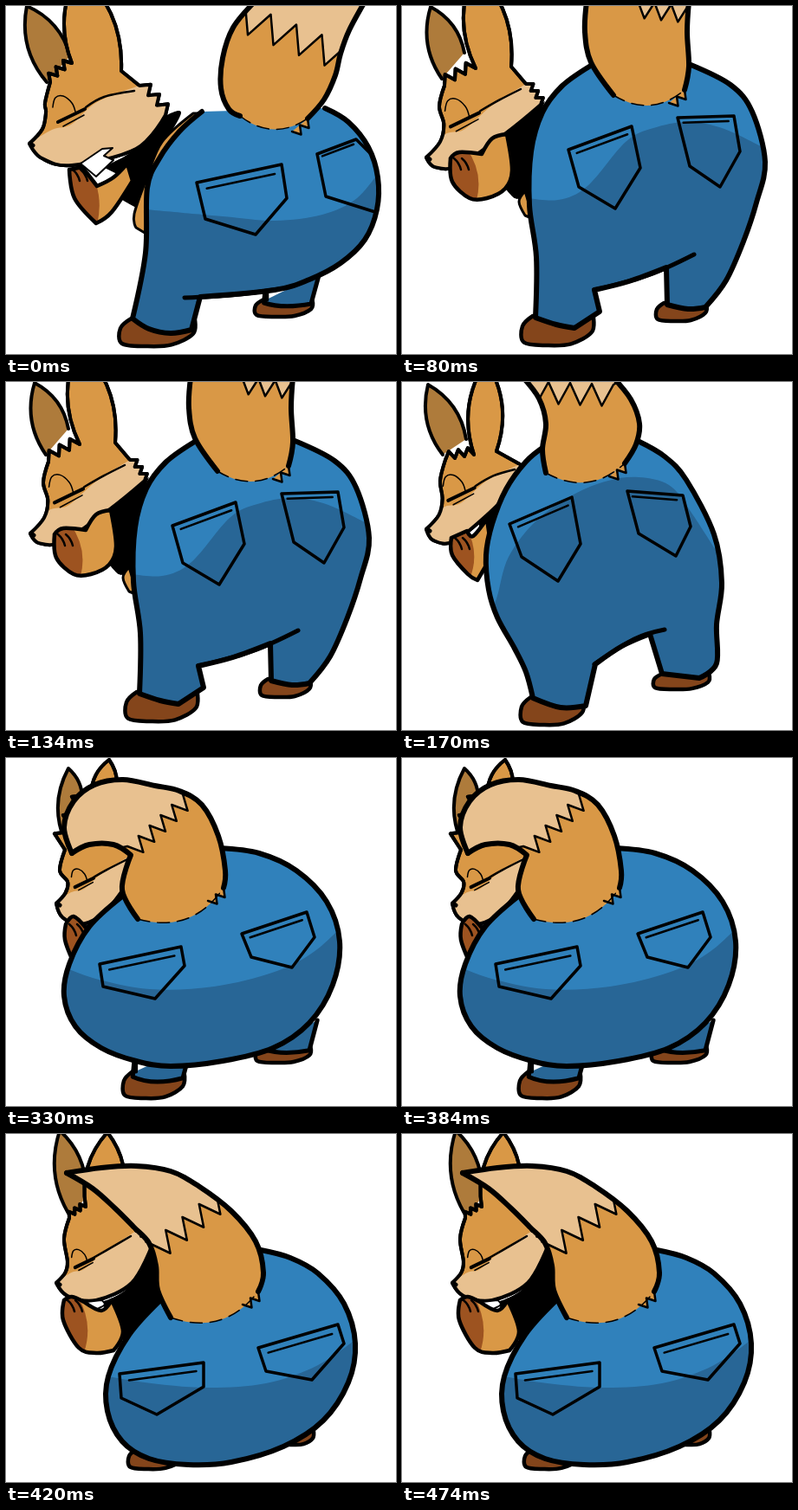
Write an HTML page that moves like this. It is 450 px wide and 402 px high and loops after 0.51 s.

```html
<!DOCTYPE html>
<html lang="en">
<head>
<meta charset="utf-8">
<title>Fox tail wag</title>
<style>
html, body { margin: 0; width: 100%; height: 100%; overflow: hidden; background: #fff; }
svg { display: block; width: 450px; height: 402px; overflow: hidden; }
path { stroke: #000; stroke-linecap: round; stroke-linejoin: round; }
#strip { animation: flip 510ms step-end infinite; }
@keyframes flip {
  0% { transform: translateX(0); }
  15.686% { transform: translateX(-450px); }
  33.333% { transform: translateX(-900px); }
  49.019% { transform: translateX(-1350px); }
  64.705% { transform: translateX(-1800px); }
  82.352% { transform: translateX(-2250px); }
}
</style>
</head>
<body>
<svg viewBox="0 0 450 402"><g id="strip"></g></svg>
<script>
const ORANGE = '#d99846', TAN = '#e8c190', EAR = '#ae7b3b', HAND = '#9d5320',
  JEANS = '#3081bb', SHADE = '#286696', SHOE = '#84451b';

// Points: "x,y" pairs, "!" marks a corner.
const pts = text => text.split(' ').map(s => {
  const p = s.split(',').map(parseFloat);
  p.hard = s.endsWith('!');
  return p.hard ? Object.assign([p[0], p[1]], { hard: true }) : p;
});
const add = (p, x, y, s = 1) => [p[0] + x * s, p[1] + y * s];

// Point at share t of a-b, pushed sideways by k times the length of a-b.
const side = (a, b, t, k) => {
  const dx = b[0] - a[0], dy = b[1] - a[1];
  return [a[0] + dx * t - dy * k, a[1] + dy * t + dx * k];
};

function spline(p, start = 'M') {
  const handle = (i, sign) => {
    const a = p[i - 1], b = p[i + 1];
    return p[i].hard || !a || !b ? p[i]
      : add(p[i], b[0] - a[0], b[1] - a[1], sign / 6);
  };
  let d = `${start}${p[0]}`;
  for (let i = 1; i < p.length; i++) d += `C${handle(i - 1, 1)} ${handle(i, -1)} ${p[i]}`;
  return d;
}

function zigzag(a, b, n, k) {
  let d = '';
  for (let i = 0; i < n; i++) d += `L${side(a, b, (i + 0.5) / n, k / n)}L${side(a, b, (i + 1) / n, 0)}`;
  return d;
}

const earSides = ([a, tip, b]) =>
  `L${a}Q${side(a, tip, 0.5, -0.24)} ${tip}Q${side(tip, b, 0.5, -0.24)} ${b}`;

const draw = (d, fill, width = 0) =>
  `<path d="${d}" fill="${fill}" stroke-width="${width}"${width ? '' : ' style="stroke:none"'}/>`;
const line = (d, width) => draw(d, 'none', width);

let clips = 0;
const clipped = (d, inside) => {
  const id = 'clip' + clips++;
  return `<clipPath id="${id}"><path d="${d}"/></clipPath><g clip-path="url(#${id})">${inside}</g>`;
};

function head({ far, near, face }) {
  const [nose, eye, crown, back, jaw, cheek, chin] = pts(face);
  const s = Math.hypot(eye[0] - nose[0], eye[1] - nose[1]) / 57;
  const farEar = pts(far), nearEar = pts(near);
  const at = (x, y) => add(eye, x, y, s);
  const lip = add(side(nose, chin, 0.35, 0), -3, 8);
  const skull = spline([nose, add(nose, 15, -17, s), add(nose, 19, -36, s), add(crown, -6, 24), crown]) +
    zigzag(crown, nearEar[0], 3, -0.8) + earSides(nearEar) + `L${back}` +
    zigzag(back, jaw, 3, -0.7) + spline([jaw, cheek, chin, lip, nose], 'L') + 'Z';
  const mask = spline([add(nose, -8, 4), at(-22, 15), at(0, 9), at(30, -17), back]) + 'L220,90V220H0Z';
  const lid = spline([at(-21, -11), at(-18, -22), at(-9, -24), at(1, -16), at(5, -6)]);
  return draw('M' + farEar[0] + earSides(farEar), EAR, 4) +
    draw(skull, ORANGE, 4) + clipped(skull, draw(mask, TAN)) + line(skull, 4) +
    line(lid, 1.5) + line(`M${at(-15, 6)}L${at(16, -9)}`, 4) + line(`M${at(-9, 11)}L${at(15, -2)}`, 1.5) +
    line(spline([at(17, -11), at(38, -23), add(back, -6, 6)]), 2.5) +
    line(`M${add(nose, 1, 0)}l3,2`, 5);
}

function arm(text, cuff) {
  const p = pts(text), [a, b] = pts(cuff);
  const d = spline([...p, p[0]]);
  const paw = `M${a}Q${side(a, b, 0.5, -0.25)} ${b}H0V${a[1]}Z`;
  return draw(d, ORANGE) + clipped(d, draw(paw, HAND)) + line(d, 4.5) +
    [4, 13].map(x => line(`M${add(p[0], x, 0)}q6,5 8,13`, 2.5)).join('');
}

function foot([x, y, w, h, leg]) {
  const at = (u, v) => [x + u * w, y + v * h];
  const shoe = spline([at(0.15, 0), at(0, 0.35), at(0.02, 0.9), at(0.35, 1), at(0.7, 0.95), at(1, 0.55), at(1.02, 0)]);
  const shin = `M${at(0.2, 0)}v-30L${at(0.15, 0.2)}Q${at(0.5, 0.55)} ${at(1, 0.25)}L${add(at(1.15, 0), 0, -30)}`;
  return draw(shoe, SHOE, 4.5) + (leg ? draw(shin, SHADE, 5) : '');
}

function pocket(text) {
  const p = pts(text), [a, b] = p;
  return line(`M${p.join('L')}Z`, 3.5) +
    line(`M${side(a, b, 0.1, 0.09)}L${side(a, b, 0.9, 0.09)}`, 2.5);
}

function jeans({ body, shade, seam, pockets }) {
  const d = spline(pts(body));
  return draw(d, JEANS) +
    clipped(d, draw(spline(pts(shade)) + 'L470,402H0Z', SHADE) + pockets.map(pocket).join('')) +
    line(d, 6) + (seam ? line(spline(pts(seam)), 5) : '');
}

function tail({ left, right, tip, curl }) {
  const l = pts(left), r = pts(right), a = l[l.length - 1], b = r[r.length - 1];
  const rump = `Q${side(a, b, 0.5, 0.36)} ${b}`;
  const d = spline(l) + rump + spline(r.reverse(), 'L') + 'Z';
  let end = '';
  if (tip) {
    const [p, q, n] = pts(tip);
    end = clipped(d, draw(`M${p}${zigzag(p, q, n[0], 1)}L${side(p, q, 6, -3)}L${side(p, q, -5, -3)}Z`, TAN, 2.5));
  }
  const root = add(b, -18, 15);
  const tuft = draw(`M${b}${zigzag(b, root, 2, -0.8)}`, ORANGE);
  const tuftLine = line(`M${b}${zigzag(b, root, 2, -0.8)}`, 2.5);
  return draw(d, ORANGE) + tuft + end + tuftLine +
    `<g stroke-dasharray="14 9">${line(`M${a}${rump}`, 1.5)}</g>` +
    line(spline(l), 6) + line(spline(r), 6) + (curl ? draw(spline(pts(curl)) + 'Z', TAN, 3) : '');
}

// face: nose, eye, crown, back of head, jaw, cheek, chin. feet: x, y, width, height, shin.
const poses = [
  {
    far: '47,88 24,0 74,58', near: '76,66 84,-40 133,75',
    face: '27,159 75,128 51,88 154,92 184,126 150,165 76,184',
    jacket: '112,186! 150,165 182,128! 202,124 172,180 159,238! 134,224! 140,200!',
    mouth: '86,182! 111,165! 123,164! 113,173! 124,178! 104,197!',
    arm: '73,189! 88,186! 105,208! 124,198 140,182! 146,202! 122,238 104,251! 79,222', cuff: '90,180 104,256',
    belly: '216,124! 180,157 163,197 148,240 150,256! 160,262! 190,160 224,124!',
    feet: [[132, 361, 84, 32], [288, 339, 64, 20, 1]],
    body: '226,122! 200,145 177,176 163,210 161,285 146,361! 165,373 190,378 214,374! 224,336! 310,328 350,316 386,297 414,270 428,235 429,198 418,163 395,134 368,118',
    shade: '150,234 250,243 310,248 365,241 405,222 435,185',
    seam: '206,337 260,334 315,327',
    pockets: ['220,204 318,183 324,222 288,264 230,246', '359,171 404,154 450,200 426,238 369,220'],
    left: '287,-5 262,25 250,60 248,95 257,119 270,127',
    right: '414,-5 396,28 386,55 380,80 367,108 348,130', tip: '276,-2 394,45 4,0'
  },
  {
    far: '46,84 33,1 72,54', near: '85,72 84,-42 126,70',
    face: '28,175 72,133 49,92 143,90 160,114 121,146 66,184',
    jacket: '118,142! 165,110! 150,160 146,222! 130,222 116,206!',
    arm: '56,176! 66,169 92,171! 104,153 121,148! 127,190 119,211 98,222 78,222 58,203', cuff: '74,164 85,228',
    belly: '142,214! 135,226 142,242! 152,246!',
    feet: [[139, 358, 80, 34], [294, 343, 56, 21]],
    body: '216,70 184,93 162,123 149,168 147,230 155,290 154,360! 178,368 199,372! 228,353! 222,328! 262,318 305,302! 306,345! 330,350 350,348! 374,317 394,272 409,227 419,180 404,122 379,91 331,67',
    shade: '140,221 180,224 214,208 258,157 290,141 330,134 372,142 425,168',
    seam: '222,328 284,311 337,287',
    pockets: ['192,166 265,139 275,187 246,234 204,209', '318,129 383,127 390,168 367,209 332,185'],
    left: '213,-5 211,30 218,65 244,103', right: '331,-5 329,30 331,70 326,97', tip: '272,-6 330,0 3,0'
  },
  {
    far: '47,84 30,3 74,66', near: '83,84 97,-24 109,80',
    face: '28,170 68,131 50,90 136,95 130,120 102,150 60,184',
    jacket: '88,160! 112,136 140,98! 120,170! 98,220!',
    arm: '57,180! 75,172! 82,178 98,158! 104,200! 87,229! 76,222 58,200', cuff: '74,168 77,230',
    feet: [[138, 364, 70, 32], [291, 337, 62, 18]],
    body: '165,74 143,92 120,124 104,164 97,200 100,240 110,272 130,308 143,335 151,365! 183,376 212,374! 223,326! 254,305 286,291! 300,337! 343,342! 363,325 363,280 369,232 360,176 328,113 303,86 272,68',
    shade: '100,275 110,247 123,202 155,160 198,130 238,114 273,110 308,119 332,148 375,215',
    seam: '222,326 268,297 303,286',
    pockets: ['124,164 196,133 206,187 180,230 138,202', '260,126 324,131 333,167 316,201 273,175'],
    left: '139,-6 158,19 166,48 162,78 166,105', right: '243,-6 264,20 274,48 270,72 257,94', tip: '144,-1 244,3 4,0'
  },
  {
    far: '52,88 33,0 74,62', near: '80,78 98,-28 126,80',
    face: '30,172 67,131 51,92 136,95 136,112 97,160 50,187',
    jacket: '90,170! 118,134 138,98! 130,150! 98,214!',
    arm: '50,178! 56,165 66,166 72,180! 96,170! 104,205! 96,220 78,224! 56,204', cuff: '68,162 76,228',
    feet: [[137, 366, 72, 25], [289, 331, 60, 21]],
    body: '142,112 114,146 98,190 95,240 108,281 130,315 149,362! 180,373 208,374! 222,358 222,318! 252,301 290,291! 300,328! 330,338 357,325! 368,232 366,190 350,145 325,111 292,91 262,85',
    shade: '86,200 120,179 164,162 202,168 236,170 272,156 312,144 340,149 375,180',
    seam: '222,318 252,301 280,291 303,289',
    pockets: ['122,188 195,157 205,208 176,249 134,227', '268,150 332,153 341,185 315,221 281,197'],
    left: '158,42 146,62 140,95 148,121 164,136', right: '150,-8! 238,-8! 258,25 266,60 263,98 256,122',
    curl: '118,-5! 102,9 94,36! 103,38! 104,66! 138,44 150,34! 158,48! 161,30 149,22! 188,4! 175,-5!'
  },
  {
    far: '68,96 72,12 88,50', near: '98,42 119,2 126,42',
    face: '58,168 90,145 68,106 148,110 150,130 116,176 88,192',
    arm: '69,192! 78,183 92,196! 104,190! 77,234! 68,210', cuff: '94,184 92,240',
    feet: [[136, 362, 68, 31, 1], [289, 333, 61, 19, 1]],
    body: '134,160 96,195 73,238 67,275 80,310 110,335 150,350 190,356 250,350 308,335 350,306 377,262 385,212 370,166 335,130 292,110 246,104',
    shade: '60,238 100,254 166,267 240,264 310,247 355,224 392,190',
    pockets: ['108,238 202,218 206,240 172,278 112,264', '272,203 347,178 356,207 330,242 283,230'],
    left: '76,110! 96,100 124,100 144,112! 134,152 152,186',
    right: '76,110 67,80 78,50 102,31 135,25 172,32 200,38 226,54 245,90 253,130 251,150', tip: '140,102 204,42 5,0'
  },
  {
    far: '76,98 62,-4 92,72', near: '92,84 117,-2 134,78',
    face: '58,172 90,150 73,97 150,112 168,130 145,172 104,192',
    jacket: '110,194! 140,178 166,132! 184,200! 136,240!',
    mouth: '84,195! 110,192! 113,198 92,207!',
    arm: '67,192! 76,188 90,194! 110,204 122,192! 135,228 124,250! 104,253 84,247 66,215', cuff: '82,186 88,258',
    feet: [[142, 364, 60, 23], [318, 342, 36, 17]],
    body: '178,192 142,232 118,280 117,320 134,355 165,375 210,382 260,379 320,361 366,331 395,287 403,242 390,196 360,161 328,143 294,134',
    shade: '108,278 160,287 230,293 300,288 360,267 410,232',
    pockets: ['131,277 228,264 228,292 174,324 133,305', '291,247 383,220 390,242 353,284 300,274'],
    left: '70,45 100,63 126,86 148,108 165,126 173,152 175,180 190,212',
    right: '70,45 110,39 150,37 190,43 222,60 260,89 288,124 297,160 291,182', tip: '165,126 242,66 4,0'
  }
];

const patch = (text, fill, width) => text ? draw(spline(pts(text)) + 'Z', fill, width) : '';
const fox = p => patch(p.jacket, '#000') + head(p) + patch(p.mouth, '#fff', 2) + arm(p.arm, p.cuff) +
  patch(p.belly, ORANGE, 3) + p.feet.map(foot).join('') + jeans(p) + tail(p);

document.getElementById('strip').innerHTML = poses
  .map((p, i) => `<g transform="translate(${i * 450})">${fox(p)}</g>`)
  .join('');
</script>
</body>
</html>
```
